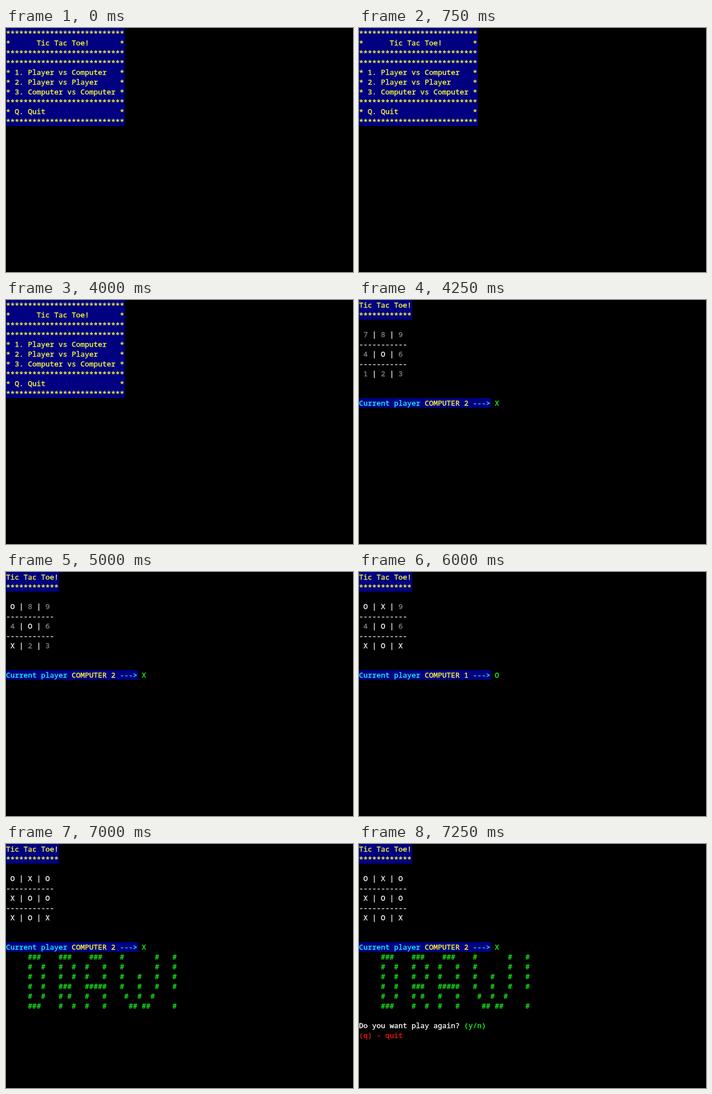
Animation, 634 px wide and 448 px high, one loop 8 s. Source, as an HTML page with a canvas:

```html
<!DOCTYPE html>
<html lang="en">
<head>
<meta charset="utf-8">
<title>Tic Tac Toe</title>
<style>
  html, body { margin: 0; width: 100%; height: 100%; overflow: hidden; background: #000; }
  canvas { display: block; }
</style>
</head>
<body>
<canvas id="screen" width="634" height="448"></canvas>
<script>
const ctx = document.getElementById('screen').getContext('2d');
const LOOP = 8000, CELL_W = 8, CELL_H = 18, BASELINE = 14, STAR_DROP = 1;
const NAVY = '#000080', YELLOW = '#ffff38', CYAN = '#20f0ff', WHITE = '#ffffff',
      GRAY = '#808080', GREEN = '#18ff18', RED = '#f01414';

const STARS = '*'.repeat(27);
const MENU = [
  STARS,
  '*      Tic Tac Toe!       *',
  STARS,
  STARS,
  '* 1. Player vs Computer   *',
  '* 2. Player vs Player     *',
  '* 3. Computer vs Computer *',
  STARS,
  '* Q. Quit                 *',
  STARS
];
const DRAW_BANNER = [
  '     ###    ###    ###    #       #   #',
  '     #  #   #  #  #   #   #       #   #',
  '     #  #   #  #  #   #   #   #   #   #',
  '     #  #   ###   #####   #   #   #   #',
  '     #  #   # #   #   #    #  #  #',
  '     ###    #  #  #   #     ## ##     #'
];

// [time, square]; O starts and the players alternate
const MOVES = [[4250, 5], [4500, 1], [5000, 7], [5250, 3], [5500, 2],
               [6000, 8], [6250, 6], [6500, 4], [7000, 9]];

// A hairline stroke gives the text its console weight
function drawText(text, x, y) {
  ctx.fillText(text, x, y);
  ctx.strokeText(text, x, y);
}

function put(col, row, text, color, back) {
  const x = col * CELL_W, y = row * CELL_H;
  if (back) {
    ctx.fillStyle = back;
    ctx.fillRect(x, y, text.length * CELL_W + 1, CELL_H);
  }
  ctx.fillStyle = ctx.strokeStyle = color;
  drawText(text.replace(/\*/g, ' '), x, y + BASELINE);
  drawText(text.replace(/[^*]/g, ' '), x, y + BASELINE + STAR_DROP);
}

function drawPointer(x, y) {
  ctx.fillStyle = WHITE;
  ctx.fill(new Path2D(`M${x} ${y}v16l4-4 3 7 3-1-3-7h5z`));
}

function drawMenu(t) {
  MENU.forEach((line, row) => put(0, row, line, YELLOW, NAVY));
  if (t >= 500 && t < 750) drawPointer(448, 428);
  if (t >= 2500 && t % 1000 >= 500) {
    ctx.fillStyle = '#c0c0c0';
    ctx.fillRect(0, 193, 8, 5);
  }
}

function drawGame(t) {
  const played = MOVES.filter(([time]) => time <= t);
  const marks = {};
  played.forEach(([, square], i) => marks[square] = 'OX'[i % 2]);

  put(0, 0, 'Tic Tac Toe!', YELLOW, NAVY);
  put(0, 1, '*'.repeat(12), YELLOW, NAVY);
  for (let n = 1; n <= 9; n++) {
    const col = 1 + (n - 1) % 3 * 4, row = 7 - Math.floor((n - 1) / 3) * 2;
    put(col, row, marks[n] || String(n), marks[n] ? WHITE : GRAY);
    if (n % 3) put(col + 2, row, '|', WHITE);
  }
  for (const row of [4, 6]) put(0, row, '-'.repeat(11), WHITE);

  const turn = played.length % 2;
  put(0, 10, 'Current player ', CYAN, NAVY);
  put(15, 10, `COMPUTER ${turn + 1} `, YELLOW, NAVY);
  put(26, 10, '--->', CYAN, NAVY);
  put(31, 10, 'OX'[turn], GREEN);

  if (t >= 7000) DRAW_BANNER.forEach((line, i) => put(0, 11 + i, line, GREEN));
  if (t >= 7250) {
    put(0, 18, 'Do you want play again?', WHITE);
    put(24, 18, '(y/n)', GREEN);
    put(0, 19, '(q) - quit', RED);
  }
}

function frame() {
  const t = performance.now() % LOOP;
  ctx.fillStyle = '#000';
  ctx.fillRect(0, 0, 634, 448);
  ctx.font = '13.3333px "Noto Sans Mono", monospace';
  ctx.lineWidth = 0.35;
  (t < 4250 ? drawMenu : drawGame)(t);
  requestAnimationFrame(frame);
}
frame();
</script>
</body>
</html>
```
